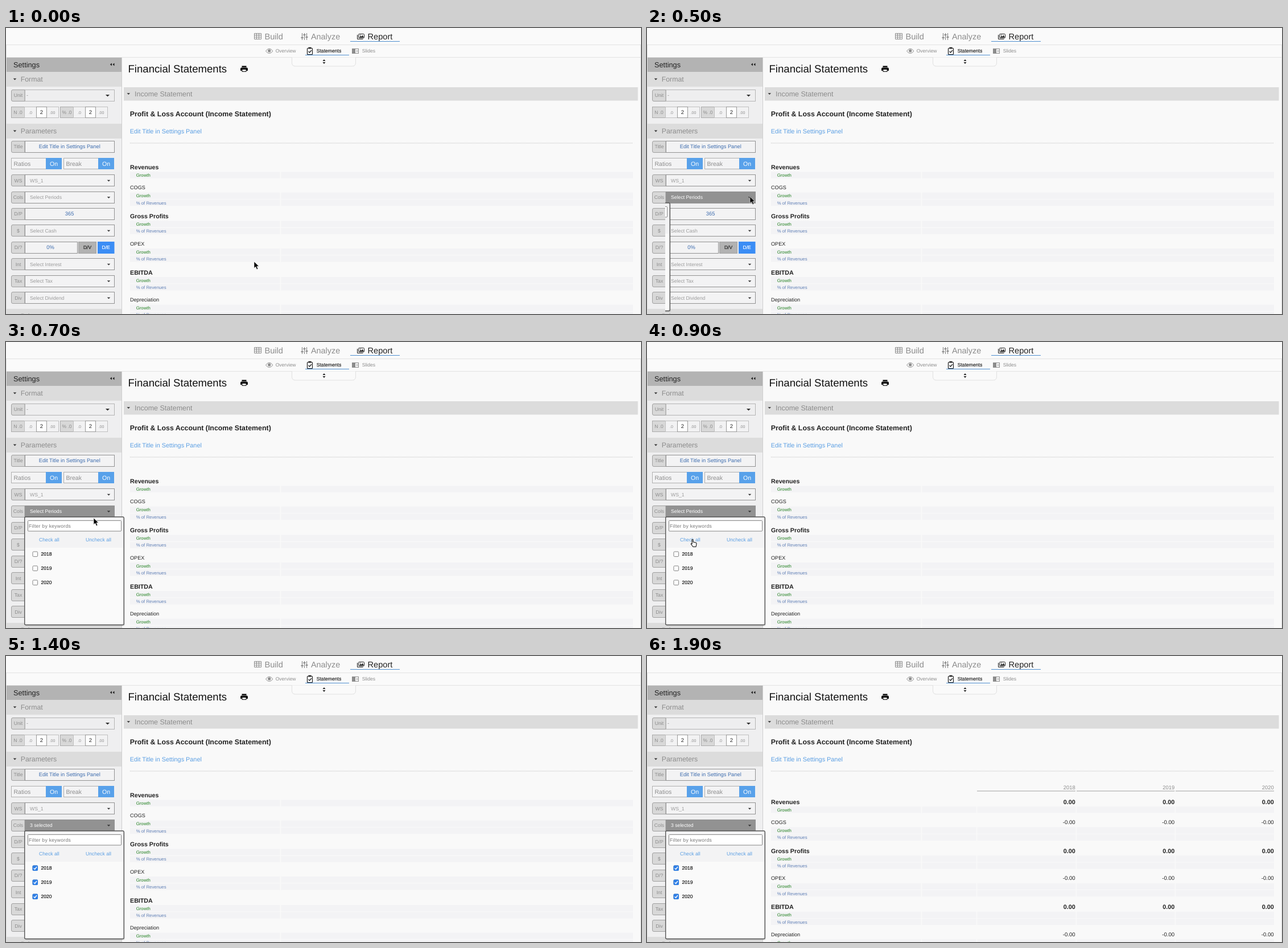
Recreate the animation shown at these times as an HTML page. Size 1116 px wide and 502 px high, loop 2000 ms.

```html
<!DOCTYPE html>
<html lang="en">
<head>
<meta charset="utf-8">
<title>Financial statements</title>
<style>
  html, body { margin: 0; width: 100%; height: 100%; overflow: hidden; background: #f9f9f9; }
  svg { display: block; width: 1116px; height: 502px; }
  text {
    font-family: "Liberation Sans", Arial, sans-serif;
    text-rendering: geometricPrecision;
    white-space: pre;
  }
</style>
</head>
<body>
<svg id="stage" viewBox="0 0 1116 502"></svg>
<script>
const STEP = 100, LOOP = 2000;
const PAGE = '#f9f9f9', GREY = '#8c8c8c', BLUE = '#5b9fe3', DEEP = '#3d6cae';

const rect = (x, y, w, h, fill, extra = '') =>
  `<rect x="${x}" y="${y}" width="${w}" height="${h}" fill="${fill}" ${extra}/>`;
const text = (x, y, size, fill, str, extra = '') =>
  `<text x="${x}" y="${y}" font-size="${size}" fill="${fill}" ${extra}>${str}</text>`;
const path = (d, fill, extra = '') => `<path d="${d}" fill="${fill}" ${extra}/>`;
const line = (d, stroke, extra = '') => path(d, 'none', `stroke="${stroke}" ${extra}`);
const MID = 'text-anchor="middle"', END = 'text-anchor="end"', BOLD = 'font-weight="bold"';
const medium = color => ` stroke="${color}" stroke-width=".18"`;
const border = color => `stroke="${color}"`;
const caret = (x, y, r = 3, fill = '#333') => path(`M${x - r} ${y - r / 2}h${2 * r}l${-r} ${r}z`, fill);

function topBar() {
  const grid = line('M436.5 9.5h12v10h-12zM436.5 12.5h12M436.5 16h12M440.5 9.5v10M444.5 9.5v10', GREY);
  const sliders = line('M520.5 9v12M524.5 9v12M528.5 9v12', GREY, 'stroke-width="1.2"') +
    line('M518.5 17h4M522.5 12h4M526.5 16h4', GREY, 'stroke-width="1.8"');
  const picture = line('M617.5 12v7.500h10', '#222') +
    rect(619.5, 10.5, 10, 7, 'none', 'stroke="#222" rx="1"') +
    path('M620.500 16.500l2.500-3 1.500 1.500 2-2.500 2.500 4z', '#222') + '<circle cx="622.3" cy="12.500" r=".8" fill="#222"/>';
  const eye = line('M456.500 40.500q6-8.500 12.500 0q-6.500 8-12.500 0z', GREY) +
    `<circle cx="462.7" cy="40" r="2.6" fill="${GREY}"/>`;
  const clipboard = rect(529.5, 35.5, 9, 11, 'none', 'stroke="#222" stroke-width="1.2" rx="1"') +
    rect(531.5, 33.8, 5, 2.6, '#222') + line('M531.500 41l2 2 3.500-4', '#222', 'stroke-width="1.2"');
  const slides = rect(608.5, 36.5, 11, 8, 'none', border(GREY)) + rect(609, 37, 5, 7, GREY) +
    line('M615.500 39.500h3M615.500 41.500h3', GREY, 'stroke-width=".8"');
  return rect(0, 0, 1116, 52, '#fafafa') +
    line('M0 29.500H1116M0 51.500H1116', '#e2e2e2') + line('M.5 29.500V502M1115.500 29.500V502', '#e0e0e0') +
    path('M502.500 51.500V61q0 6 6 6h100q6 0 6-6V51.500', '#fafafa', border('#e0e0e0')) +
    path('M556.500 58l2.500-3 2.500 3zM556.500 60l2.500 3 2.500-3z', '#222') +
    grid + sliders + picture + eye + clipboard + slides +
    text(454.5, 20, 14.6, GREY, 'Build') + text(536, 20, 14.4, GREY, 'Analyze') +
    text(635.5, 20, 14.6, '#222', 'Report') +
    text(473.7, 43.2, 8.55, GREY, 'Overview') + text(545.7, 43.2, 8.65, '#222', 'Statements', medium('#222')) +
    text(625.7, 43.2, 8.6, GREY, 'Slides') +
    rect(605, 23, 87, 1, '#4f8fd0') + rect(526, 47, 77, 1, '#4f8fd0');
}

function section(y, title) {
  return rect(1, y, 202, 26, '#dcdcdc') + caret(15.5, y + 13, 2.8) + text(25.7, y + 17.4, 12.3, GREY, title);
}

// Half-pixel top edge that keeps one-pixel borders sharp.
const boxTop = y => Math.floor(y - 10) + .5;
const tag = (y, str) =>
  path(`M33 ${boxTop(y)}H12q-2.500 0-2.500 2.500v15q0 2.500 2.500 2.500H33z`, '#d8d8d8', border('#a0a0a0')) +
  text(21.5, y + 3.4, 8.7, GREY, str, MID);
const field = (y, w = 157) => rect(33.5, boxTop(y), w, 20, '#f3f3f4', border('#929292'));

function select(y, label, hint) {
  return tag(y, label) + field(y) + text(42, y + 3, 8.7, '#9b9b9b', hint) + caret(180.5, y + .7, 2.8);
}

function decimals(x, label) {
  return rect(x, 138.5, 23, 19, '#d8d8d8', border('#ababab')) +
    rect(x + 23, 138.5, 60, 19, '#f2f2f3', border('#c0c0c0')) +
    rect(x + 44, 138.5, 18, 19, '#fff', border('#999')) +
    text(x + 11.5, 151, 8.5, GREY, label, MID) + text(x + 33.5, 150.5, 7, GREY, '.0', MID) +
    text(x + 53, 151.3, 9.5, '#222', '2', MID) + text(x + 72, 150.5, 7, GREY, '.00', MID);
}

function toggle(x, w, label) {
  return rect(x, 228.5, w, 19, '#f3f3f4', border('#b0b0b0')) + rect(x + w - 27.5, 228, 28, 20, '#58a1ea') +
    text(x + 4, 242, 10.5, GREY, label) + text(x + w - 13.5, 242, 10.5, '#fff', 'On', MID);
}

function sidebar() {
  return rect(1, 52, 202, 450, '#efeff0') + rect(1, 52, 202, 25, '#b3b3b3') +
    text(13, 69, 12.75, '#222', 'Settings') +
    path('M186 61.500v5l-3.200-2.500zM190.500 61.500v5l-3.200-2.500z', '#222') +
    line('M203.500 52V502', '#cfcfcf') +
    section(77, 'Format') + section(168, 'Parameters') + section(493, 'Drivers') +
    tag(118, 'Unit') + rect(33.5, 108.5, 157, 20, '#eeeeef', border('#b4b4b4')) +
    text(36, 121, 9, GREY, '-') + caret(178.5, 118.7, 3.6) +
    decimals(9.5, 'N .0') + decimals(95.5, '% .0') +
    tag(208, 'Title') + field(208) + text(111.7, 211, 9.3, DEEP, 'Edit Title in Settings Panel', MID) +
    toggle(9.5, 88, 'Ratios') + toggle(101.5, 88, 'Break') +
    select(267.5, 'WS', 'WS_1') + select(297, 'Cols', 'Select Periods') +
    tag(326, 'D/P') + field(326) + text(111.7, 328.5, 9.4, DEEP, '365', MID) +
    select(355.5, '$', 'Select Cash') +
    tag(385, 'D/?') + field(385, 92) + text(78, 387.5, 9.4, DEEP, '0%', MID) +
    rect(127.5, 375.5, 31, 20, '#b2b2b2', border('#a2a2a2')) + text(143, 388, 8.5, '#222', 'D/V', MID + medium('#222')) +
    rect(161, 375, 29.5, 21, '#3b8df5') + text(175.7, 388, 8.5, '#fff', 'D/E', MID + medium('#fff')) +
    select(414.5, 'Int', 'Select Interest') + select(444, 'Tax', 'Select Tax') + select(473.5, 'Div', 'Select Dividend');
}

const items = [
  ['Revenues', 244, true], ['COGS', 280.2], ['Gross Profits', 330, true],
  ['OPEX', 378.5], ['EBITDA', 428.5, true], ['Depreciation', 477]
];
const columns = [[2018, 580, 753], [2019, 755, 927.5], [2020, 929, 1102]];

function ratio(y, str, color) {
  return rect(218, y - 5.7, 884, 11.2, '#f3f3f5') + text(228.7, y + 2.8, 7.8, color, str);
}

function reportRows() {
  return items.map(([name, y, bold], i) =>
    text(218, y + (bold ? 4 : 3.2), bold ? 10.7 : 9.1, '#222', name, bold ? BOLD : '') +
    ratio(y + 14.3, 'Growth', '#22801f') + (i ? ratio(y + 26.6, '% of Revenues', '#6180b6') : '')
  ).join('') + line('M482.500 225V520', PAGE, 'stroke-width="1.500"');
}

function reportColumns() {
  return columns.map(([year, left, right]) =>
    line(`M${left - .5} 225V520`, PAGE, 'stroke-width="1.500"') +
    line(`M${left} 225.300H${right}`, '#a0a0a0') + text(right - .3, 222, 9.4, GREY, year, END) +
    items.map(([, y, bold]) => bold
      ? text(right - .3, y + 4, 10.8, '#222', '0.00', END + ' ' + BOLD)
      : text(right - .3, y + 3.2, 9.6, '#222', '-0.00', END)).join('')
  ).join('');
}

function report() {
  return text(214.5, 77.8, 18.6, '#111', 'Financial Statements') +
    path('M414.500 66.500h8v2.500h-8zM414 69.500h9q2 0 2 2v3.500h-2.500v2h-8v-2H412v-3.500q0-2 2-2zM415.500 73v3h6v-3z', '#111', 'fill-rule="evenodd"') +
    rect(207, 104, 903.5, 23.5, '#dcdcdc') + caret(215.3, 115.7, 2.8) +
    text(226, 120.3, 12.5, GREY, 'Income Statement') +
    text(217.7, 154.8, 12.4, '#222', 'Profit &amp; Loss Account (Income Statement)', BOLD) +
    text(217.7, 184.5, 10.87, BLUE, 'Edit Title in Settings Panel') +
    line('M218 202H1102', '#bcbcbc', 'stroke-dasharray="1 1"') +
    `<g id="rows">${reportRows()}<g id="columns">${reportColumns()}</g></g>`;
}

function periodMenu() {
  const option = (year, i) => {
    const y = 368 + i * 25;
    return rect(47, y, 8.6, 8.6, '#fff', 'stroke="#767676" stroke-width=".9" rx="1.500"') +
      text(61.5, y + 6.7, 8.6, '#111', year, medium('#111'));
  };
  const tick = (_, i) => {
    const y = 368 + i * 25;
    return rect(46.6, y - .4, 9.4, 9.4, '#2f7fe6', 'rx="1.700"') +
      line(`M48.700 ${y + 4.5}l2 2 3.300-4.500`, '#fff', 'stroke-width="1.400"');
  };
  const years = columns.map(c => c[0]);
  return rect(33, 287, 158, 20, '#929292') +
    text(42, 300, 8.7, '#fff', '', 'id="picked"') + caret(180.5, 297.7, 2.8) +
    `<g clip-path="url(#menuClip)"><g id="menu">` +
    rect(33.7, 308.5, 175, 190, '#000', 'opacity=".12" rx="2"') +
    rect(32.7, 307, 174.5, 189.5, '#fafafa', 'rx="2"') + rect(33, 307, 174, 54, '#f3f3f4') +
    rect(32.7, 307, 174.5, 189.5, 'none', 'stroke="#555" stroke-width="1.400" rx="2"') +
    rect(38.5, 313.5, 164, 18.5, '#fff', 'stroke="#858585" rx="1"') +
    text(40, 326.3, 8.6, '#757575', 'Filter by keywords', 'letter-spacing=".27"') +
    text(58, 349.5, 8.7, BLUE, 'Check all') + text(140, 349.5, 8.7, BLUE, 'Uncheck all') +
    years.map(option).join('') + `<g id="ticks">${years.map(tick).join('')}</g></g></g>`;
}

const cursors =
  path('M0 0V11.500l2.700-2.500 2.100 4.700 2-.9-2-4.500h3.700z', '#000', 'id="arrow" stroke="#fff" stroke-width=".6"') +
  path('M2 1q1.200-1 2 0v4l5 1.200q1.200.6 1 2L9 13.500H4L.5 9q-.6-1.500.8-1.300L2.200 8.500z', '#fff',
    'id="hand" stroke="#111" stroke-width="1.100" stroke-linejoin="round"');

document.getElementById('stage').innerHTML =
  '<defs><clipPath id="menuClip"><rect x="32" y="306" width="184" height="196"/></clipPath></defs>' +
  rect(0, 0, 1116, 502, PAGE) + topBar() + report() + sidebar() +
  `<g id="dropdown">${periodMenu()}</g>` + cursors;

const el = id => document.getElementById(id);
const show = (id, on) => el(id).setAttribute('display', on ? 'inline' : 'none');
const move = (id, x, y) => el(id).setAttribute('transform', `translate(${x} ${y})`);
const ease = (t, from, to) => {
  const p = Math.min(1, Math.max(0, (t - from) / (to - from)));
  return p * p * (3 - 2 * p);
};

function update(t) {
  const open = t >= 500, checked = t >= 1100, filled = t >= 1500;
  show('dropdown', open);
  move('menu', t < 600 ? -167 : t < 700 ? -14 : 0, 0);
  show('ticks', checked);
  el('picked').textContent = checked ? '3 selected' : 'Select Periods';

  show('columns', filled);
  move('rows', 0, filled ? 11.7 : 0);

  const toField = ease(t, 0, 300), toLink = ease(t, 600, 900);
  const x = 436 - 255 * toField - 104 * toLink;
  const y = 410 - 114 * toField + 50 * toLink;
  const visible = t < 1200, overLink = t >= 900;
  show('arrow', visible && !overLink);
  show('hand', visible && overLink);
  move('arrow', x, y);
  move('hand', x, y);
}

const start = performance.now();
function frame() {
  const t = (performance.now() - start) % LOOP;
  update(Math.floor(t / STEP) * STEP);
  requestAnimationFrame(frame);
}
update(0);
requestAnimationFrame(frame);
</script>
</body>
</html>
```
